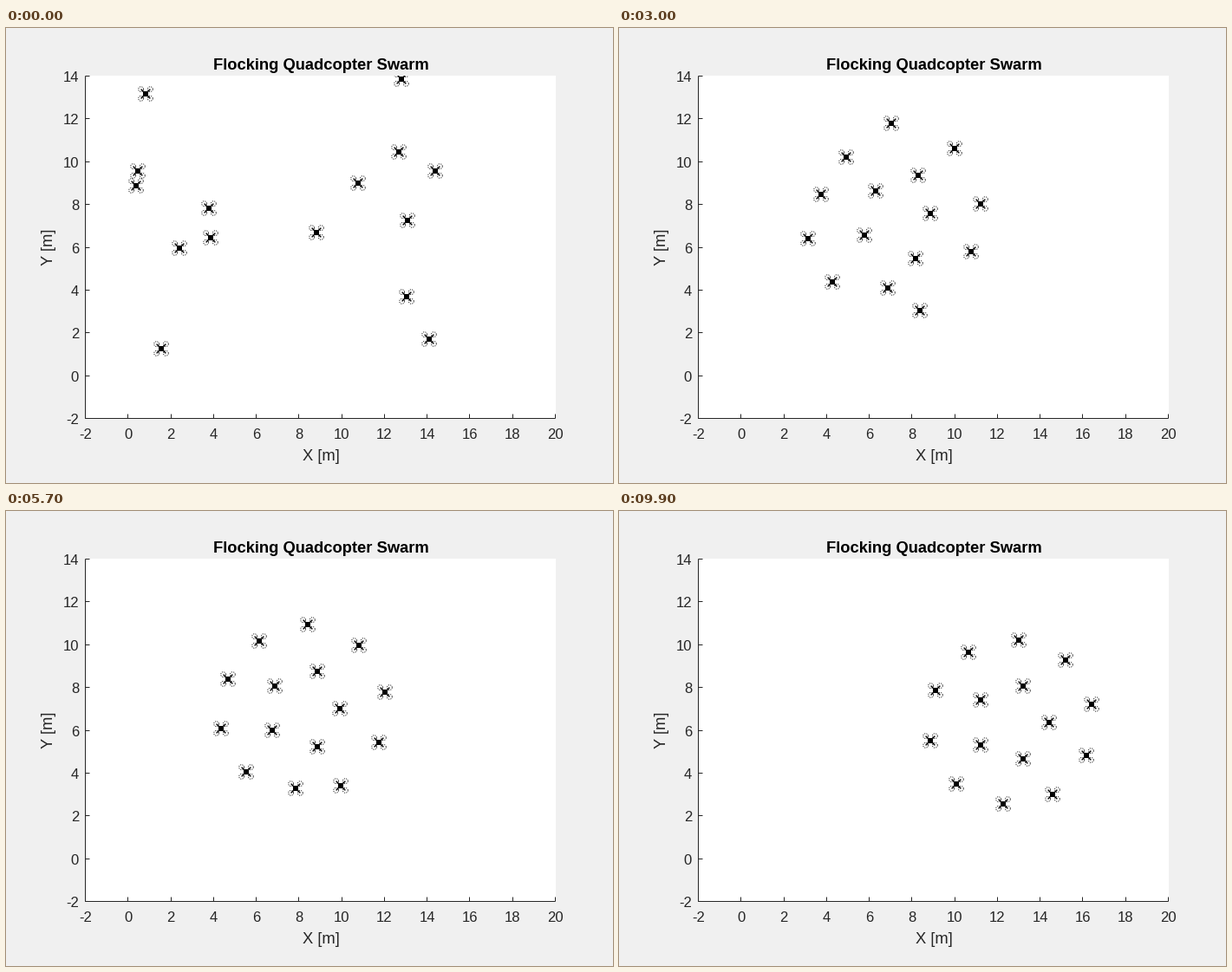
These frames come from a looping animation (700x525 px, 10000 ms). A matplotlib script:

```python
import numpy as np
import matplotlib.pyplot as plt
from matplotlib.animation import FuncAnimation
from matplotlib.patches import Rectangle

W, H, DPI = 700, 525, 100
FRAMES, STEP = 100, 100
LEFT, RIGHT, TOP, BOTTOM = 91, 633, 55, 450
INK = "#262626"
T_JOIN, RELAX = 2.2, 2.0

# Key poses in stage pixels: ten outer drones clockwise, then five inner ones
start = np.array([(495, 165), (463, 222), (488, 359), (358, 236), (179, 370),
                  (200, 254), (150, 182), (152, 165), (161, 76), (456, 59),
                  (406, 179), (462, 310), (236, 242), (234, 208), (453, 143)])
joined = np.array([(420, 203), (406, 255), (337, 335), (310, 291), (242, 291),
                   (214, 241), (234, 194), (258, 151), (308, 100), (390, 132),
                   (357, 209), (347, 265), (283, 233), (303, 183), (351, 164)])


def circle(n, radius, phase=0):
    a = np.radians(phase) + 2 * np.pi * np.arange(n) / n
    return radius * np.column_stack([np.cos(a), np.sin(a)])


slots = np.vstack([circle(10, 95, -12.7), circle(5, 44)])


def formation(t):
    """Two rings whose centre speeds up to the right and sinks steadily."""
    return slots + [317.2 + 2.485 * (t - 2.53) ** 2, 208.7 + 3.57 * t]


def flock(t):
    if t <= T_JOIN:
        return joined + (start - joined) * (1 - t / T_JOIN) ** 5
    error = joined - formation(T_JOIN)
    return formation(t) + error * np.exp((T_JOIN - t) / RELAX)


def px(size):
    return size * 72 / DPI


plt.rcParams["font.family"] = "Liberation Sans"
fig = plt.figure(figsize=(W / DPI, H / DPI), dpi=DPI, facecolor="#f0f0f0")
ax = fig.add_axes([0, 0, 1, 1])
ax.set(xlim=(0, W), ylim=(H, 0))
ax.axis("off")

plot_area = Rectangle((LEFT, TOP), RIGHT - LEFT + 1, BOTTOM - TOP + 1,
                      fc="white", lw=0, zorder=0)
ax.add_patch(plot_area)


def rule(x, y):
    ax.plot(x, y, color=INK, lw=px(1), solid_capstyle="butt", zorder=3)


def label(x, y, text, size, ha="center", color=INK, **kw):
    ax.text(x, y, text, fontsize=px(size), ha=ha, color=color,
            **{"va": "baseline", **kw})


rule([LEFT, LEFT], [TOP, BOTTOM])
rule([LEFT, RIGHT], [BOTTOM, BOTTOM])
for v in range(-2, 21, 2):
    x = LEFT + (v + 2) * (RIGHT - LEFT) / 22
    rule([x, x], [BOTTOM, BOTTOM - 5])
    label(x + 0.5, 474, str(v), 16.67)
for v in range(-2, 15, 2):
    y = BOTTOM - (v + 2) * (BOTTOM - TOP) / 16
    rule([LEFT, LEFT + 5], [y, y])
    label(84, y + 7, str(v), 16.67, ha="right")
label(363, 48, "Flocking Quadcopter Swarm", 18.33, color="black", weight="bold")
label(363, 499, "X [m]", 18.33)
label(50, 252.5, "Y [m]", 18.33, rotation=90, va="center")

# One drone around its centre; NaN rows lift the pen
GAP = [[np.nan, np.nan]]
tips = circle(4, 7.6, 45)
ring = circle(24, 2.9)
ring = np.vstack([ring, ring[:1]])
arms = np.vstack([tips[[0, 2]], GAP, tips[[1, 3]], GAP])
rotors = np.vstack([np.vstack([ring + tip, GAP]) for tip in tips])

pen = dict(color="black", zorder=2)
arm_line, = ax.plot([], [], lw=px(1.4), solid_capstyle="butt", **pen)
rotor_line, = ax.plot([], [], lw=px(0.8), ls=(0, (1.5, 1.5)),
                      dash_capstyle="butt", **pen)
bodies, = ax.plot([], [], "s", ms=px(6), mew=0, **pen)
for artist in (arm_line, rotor_line, bodies):
    artist.set_clip_path(plot_area)


def place(line, shape, centres):
    pts = (centres[:, None] + shape).reshape(-1, 2)
    line.set_data(pts[:, 0], pts[:, 1])


def update(i):
    centres = np.round(flock(i * STEP / 1000))
    place(arm_line, arms, centres)
    place(rotor_line, rotors, centres)
    place(bodies, np.zeros((1, 2)), centres)
    return arm_line, rotor_line, bodies


anim = FuncAnimation(fig, update, frames=FRAMES, interval=STEP,
                     repeat=True, repeat_delay=0)
plt.show()
```
